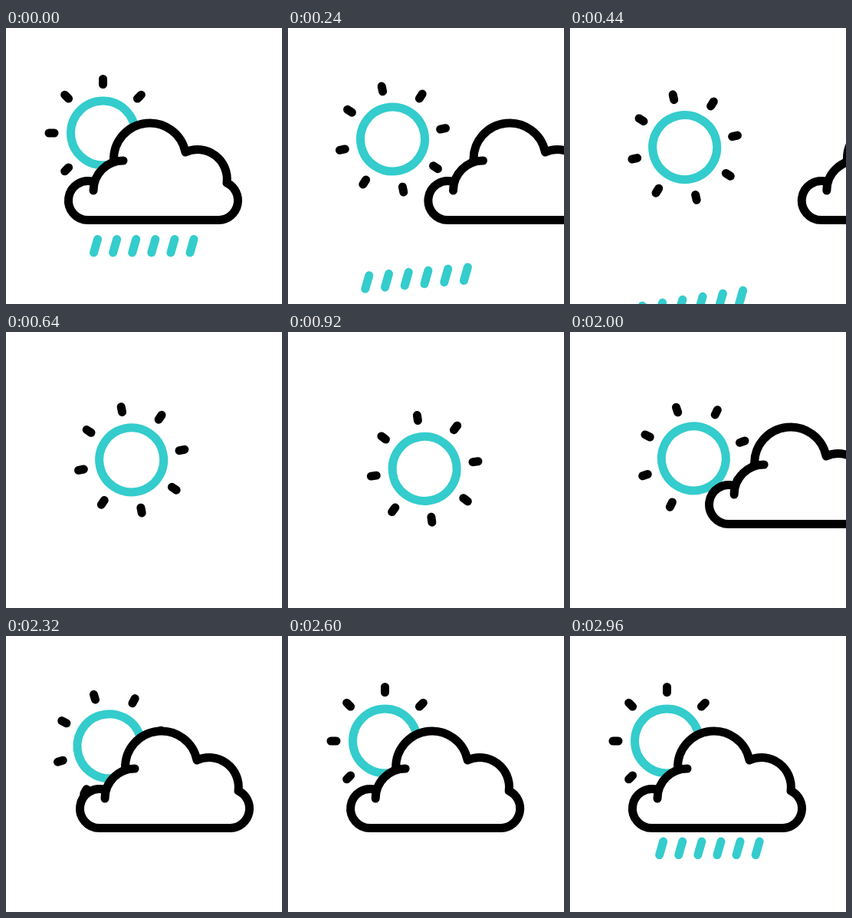
Animation, 360 px wide and 360 px high, one loop 3000 ms. Source, as an HTML page:

```html
<!DOCTYPE html>
<html lang="en">
<head>
<meta charset="utf-8">
<title>Sun, cloud and rain</title>
<style>
  html, body { margin: 0; width: 100%; height: 100%; overflow: hidden; background: #fff; }
  svg { display: block; width: 100vw; height: 100vh; }
</style>
</head>
<body>
<svg viewBox="0 0 360 360" fill="none" stroke="#000" stroke-width="11" stroke-linecap="round" stroke-linejoin="round">
  <g id="sun">
    <circle r="42" stroke="#34cccc"/>
  </g>
  <g id="rain" stroke="#34cccc"></g>
  <g id="cloud" fill="#fff">
    <path d="M114 200.5A25.5 25.5 0 1 0 107 250.5H278A25.5 25.5 0 0 0 288 202A38.5 38.5 0 0 0 234 162A47.2 47.2 0 0 0 140.5 172"/>
    <path d="M114 212A39 39 0 0 1 153 173"/>
  </g>
</svg>
<script>
const LOOP = 3000, STEP = 40;
const RAY_INNER = 63.5, RAY_OUTER = 70.5;
const RAY_GROWTH = [21, 18, 21, 15, 21.5, 18, 21, 21];
const DROPS = 6;

const byId = id => document.getElementById(id);
const sun = byId('sun'), rain = byId('rain'), cloud = byId('cloud');

function addLine(parent, attrs) {
  const line = document.createElementNS('http://www.w3.org/2000/svg', 'line');
  for (const key in attrs) line.setAttribute(key, attrs[key]);
  return parent.appendChild(line);
}

const rays = RAY_GROWTH.map((_, i) =>
  addLine(sun, { y1: -RAY_INNER, y2: -RAY_OUTER, transform: `rotate(${i * 45})` }));
const drops = Array.from({ length: DROPS }, (_, i) => {
  const x = 119.5 + i * 25.1;
  return addLine(rain, { x1: x, y1: 275.5, x2: x - 5, y2: 293 });
});

const progress = (t, from, to) => Math.min(1, Math.max(0, (t - from) / (to - from)));
const smooth = x => x * x * (3 - 2 * x);
// Smooth ease that leaves with a small initial speed
const depart = x => smooth(x) + 0.41 * x * (1 - x) ** 2;

function sunTravel(t) {
  return t < 1400 ? depart(progress(t, 0, 1065)) : 1 - smooth(progress(t, 1630, 2550));
}

function cloudOffset(t) {
  return t < 1200
    ? 305 * depart(progress(t, 0, 700))
    : 317 * (1 - progress(t, 1680, 2683)) ** 3;
}

function dropFall(t, i) {
  return t < 1500 ? t * (0.152 + 0.009 * (DROPS - 1 - i)) : (t - LOOP) * 0.185;
}

function draw(t) {
  const p = sunTravel(t);
  sun.setAttribute('transform',
    `translate(${126.5 + 54 * p} ${137 + 43.3 * p}) rotate(${180 * p})`);

  const stretch = Math.sin(Math.PI * progress(t, 1160, 1880)) ** 2;
  rays.forEach((ray, i) => ray.setAttribute('y2', -RAY_OUTER - RAY_GROWTH[i] * stretch));

  cloud.setAttribute('transform', `translate(${cloudOffset(t)})`);

  rain.setAttribute('visibility', t < 760 || t > 2680 ? 'visible' : 'hidden');
  drops.forEach((drop, i) => {
    const dy = dropFall(t, i);
    drop.setAttribute('transform', `translate(${-0.29 * dy} ${dy})`);
  });
}

const start = performance.now();
function tick() {
  const t = (performance.now() - start) % LOOP;
  draw(Math.floor(t / STEP) * STEP);
  requestAnimationFrame(tick);
}
tick();
</script>
</body>
</html>
```
